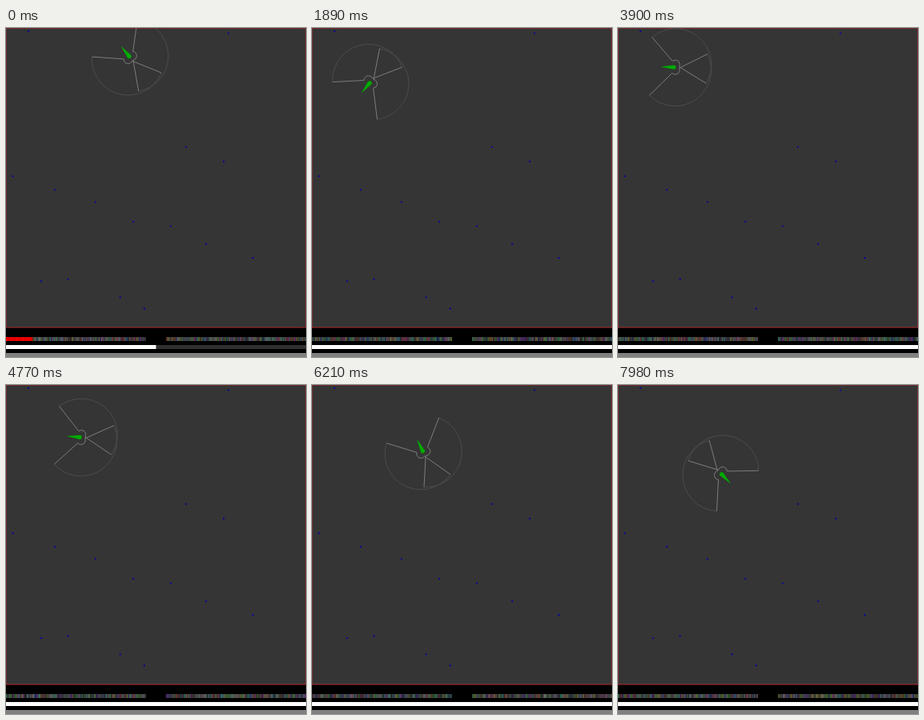
Write an HTML page with a canvas that moves like this. It is 375 by 412 pixels and loops after 8 s.

```html
<!DOCTYPE html>
<html>
<head>
<meta charset="utf-8">
<style>
html, body { margin: 0; width: 100%; height: 100%; overflow: hidden; background: #000; }
canvas { display: block; width: 375px; height: 412px; }
</style>
</head>
<body>
<canvas id="stage" width="375" height="412"></canvas>
<script>
const ctx = document.getElementById('stage').getContext('2d');
const LOOP = 8000, STEP = 30, SIZE = 375;
const RANGE = 45, INNER = 5.5, EYE_GAP = 3.5, CRUISE = 40;
const OUTER_EDGE = 133, INNER_EDGE = 29, FOV = OUTER_EDGE + INNER_EDGE;
const STRIP_W = 175, CELLS = 100;
const rad = d => d * Math.PI / 180;

function makeRandom(seed) {
  let s = seed >>> 0;
  return () => {
    s = (s + 0x6D2B79F5) >>> 0;
    let r = Math.imul(s ^ s >>> 15, 1 | s);
    r = r + Math.imul(r ^ r >>> 7, 61 | r) ^ r;
    return ((r ^ r >>> 14) >>> 0) / 4294967296;
  };
}

// Two pieces at the top edge, the rest spread over the lower part with some jitter.
function scatterFood(count) {
  const random = makeRandom(5);
  const food = [{ x: 28, y: 4 }, { x: 278, y: 6.5 }];
  for (let i = 0; i < count; i++) {
    const jitter = () => (random() - 0.5) * 3 * i;
    food.push({
      x: Math.max(4, (225 + 48 * i) % 310 + jitter()),
      y: Math.min(367, 149 + 18 * i + jitter())
    });
  }
  return food;
}
const food = scatterFood(13);

// Key poses: time, place and heading in degrees.
const pose = (t, x, y, h) => ({ t, x, y, h });
const path = [
  pose(0, 155.2, 37, 51),
  pose(1890, 73.3, 67.5, 310),
  pose(3000, 48.6, 33.6, 0),
  pose(4770, 94, 65.6, 5),
  pose(5550, 139.6, 71, 57),
  pose(6900, 135.5, 99.9, 71.5),
  pose(7980, 128.3, 110.5, 226)
];

function hermite(a, b, va, vb, u) {
  const u2 = u * u, u3 = u2 * u;
  return a * (2 * u3 - 3 * u2 + 1) + va * (u3 - 2 * u2 + u)
       + b * (3 * u2 - 2 * u3) + vb * (u3 - u2);
}

// The creature passes each key pose at cruising speed, along its heading.
function poseAt(t) {
  let i = 0;
  while (i < path.length - 2 && t >= path[i + 1].t) i++;
  const a = path[i], b = path[i + 1];
  const u = (t - a.t) / (b.t - a.t), reach = CRUISE * (b.t - a.t) / 1000;
  const blend = (axis, dir) =>
    hermite(a[axis], b[axis], dir(rad(a.h)) * reach, dir(rad(b.h)) * reach, u);
  return { x: blend('x', Math.cos), y: blend('y', Math.sin), h: a.h + (b.h - a.h) * u };
}

// side: -1 is the left eye, 1 the right one
function eyeOf(body, side) {
  const h = rad(body.h);
  return {
    x: body.x - Math.sin(h) * EYE_GAP * side,
    y: body.y + Math.cos(h) * EYE_GAP * side,
    from: body.h - (side < 0 ? OUTER_EDGE : INNER_EDGE)
  };
}

function look(eye, angle) {
  const c = Math.cos(angle), s = Math.sin(angle);
  const spotted = food.some(f => {
    const dx = f.x - eye.x, dy = f.y - eye.y, along = dx * c + dy * s;
    return along > 0 && along < RANGE && Math.abs(dy * c - dx * s) < 1.1;
  });
  if (spotted) return 'food';
  const ex = eye.x + c * RANGE, ey = eye.y + s * RANGE;
  return Math.min(ex, ey) < 0 || Math.max(ex, ey) > SIZE ? 'wall' : '';
}

function drawStrip(eye, left, random) {
  const w = STRIP_W / CELLS;
  const shade = () => Math.round(35 + random() * 75);
  for (let i = 0; i < CELLS; i++) {
    const seen = look(eye, rad(eye.from + (i + 0.5) / CELLS * FOV));
    const noise = `rgb(${shade()},${shade()},${shade()})`;
    ctx.fillStyle = seen === 'food' ? '#0000c8' : seen === 'wall' ? '#ff0000' : noise;
    ctx.fillRect(left + i * w, 387, w, 5);
  }
}

function drawEye(eye) {
  const a = rad(eye.from), b = rad(eye.from + FOV);
  ctx.strokeStyle = '#4c4c4c';
  ctx.beginPath();
  ctx.arc(eye.x, eye.y, RANGE, a, b);
  ctx.stroke();
  ctx.strokeStyle = '#7c7c7c';
  ctx.beginPath();
  ctx.moveTo(eye.x + Math.cos(a) * RANGE, eye.y + Math.sin(a) * RANGE);
  ctx.arc(eye.x, eye.y, INNER, a, b);
  ctx.lineTo(eye.x + Math.cos(b) * RANGE, eye.y + Math.sin(b) * RANGE);
  ctx.stroke();
}

function drawBody(body) {
  ctx.save();
  ctx.translate(body.x, body.y);
  ctx.rotate(rad(body.h));
  ctx.fillStyle = '#00aa00';
  ctx.beginPath();
  ctx.moveTo(-18.5, 0);
  ctx.arc(-2, 0, 2.7, -Math.PI / 2, Math.PI / 2);
  ctx.fill();
  ctx.restore();
}

function drawBar(y, color, share) {
  ctx.fillStyle = color;
  ctx.fillRect(0, y, SIZE * share, 5);
}

function draw(t) {
  const body = poseAt(t);
  const eyes = [eyeOf(body, -1), eyeOf(body, 1)];
  const random = makeRandom(t * 131 + 7);

  ctx.fillStyle = '#000';
  ctx.fillRect(0, 0, SIZE, 412);
  ctx.fillStyle = '#353535';
  ctx.fillRect(0, 0, SIZE, SIZE);
  ctx.lineWidth = 1;
  ctx.strokeStyle = '#b02a2a';
  ctx.strokeRect(0, 0, SIZE, SIZE);

  ctx.fillStyle = '#0000a8';
  for (const f of food) {
    ctx.beginPath();
    ctx.arc(f.x, f.y, 1.1, 0, Math.PI * 2);
    ctx.fill();
  }

  ctx.save();
  ctx.beginPath();
  ctx.rect(0, 0, SIZE, SIZE);
  ctx.clip();
  eyes.forEach(drawEye);
  drawBody(body);
  ctx.restore();

  drawStrip(eyes[0], 0, random);
  drawStrip(eyes[1], 200, random);
  drawBar(397, '#303030', 1);
  drawBar(397, '#fff', t < STEP ? 0.5 : 1);
  drawBar(407, '#808080', 1);
}

const start = performance.now();
function frame() {
  const t = (performance.now() - start) % LOOP;
  draw(Math.floor(t / STEP) * STEP);
  requestAnimationFrame(frame);
}
frame();
</script>
</body>
</html>
```
